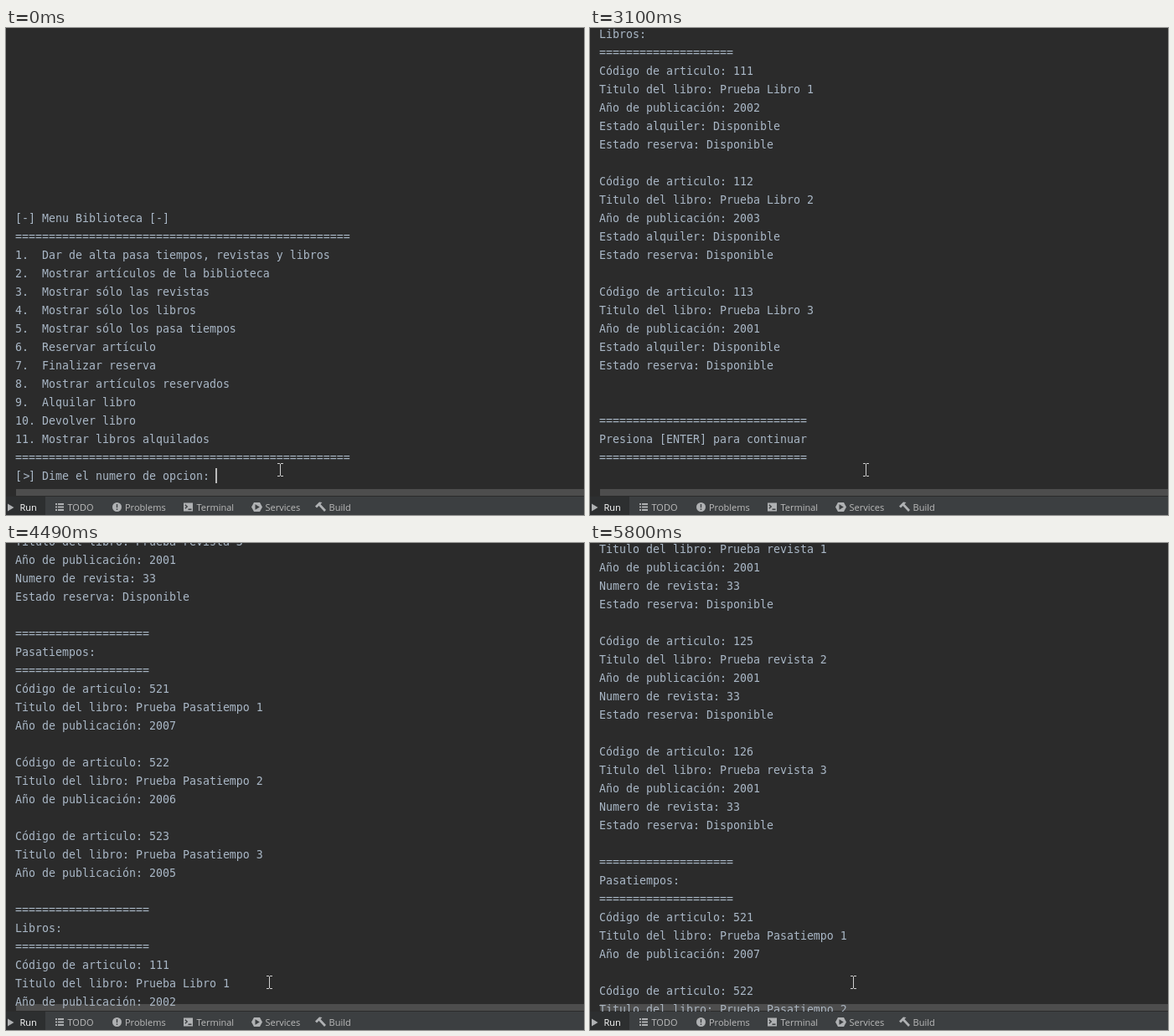
Recreate the animation shown at these times as an HTML page. Size 690 px wide and 582 px high, loop 8380 ms.

```html
<!DOCTYPE html>
<html lang="es">
<head>
<meta charset="utf-8">
<title>Menu Biblioteca</title>
<style>
  html, body { margin: 0; width: 100%; height: 100%; overflow: hidden; background: #2b2b2b; }
  svg { display: block; }
  .console text { font: 13.29px "DejaVu Sans Mono", "Noto Sans Mono", monospace; fill: #a9b7c6; white-space: pre; font-variant-ligatures: none; }
  .tabs text { font: 11px "Open Sans", "Noto Sans", sans-serif; fill: #bbbbbb; }
  .icon { fill: #afb1b3; }
  .cut { fill: none; stroke: #3c3f41; stroke-width: 1.4; }
</style>
</head>
<body>
<svg width="690" height="582" viewBox="0 0 690 582">
  <defs><clipPath id="view"><rect width="690" height="560"/></clipPath></defs>
  <rect width="690" height="582" fill="#2b2b2b"/>
  <g class="console" clip-path="url(#view)">
    <g id="rows"></g>
    <rect id="caret" width="2" height="18" fill="#bbbbbb"/>
  </g>
  <rect x="12" y="551" width="678" height="8" fill="#a6a6a6" fill-opacity=".28"/>
  <g class="tabs">
    <rect y="560" width="690" height="22" fill="#3c3f41"/>
    <rect y="560" width="47" height="22" fill="#2d2f30"/>
    <path class="icon" d="M2 568.5L9.5 573L2 577.5Z"/>
    <path class="icon" d="M59 568h2v2h-2zM62 568h7v2h-7zM59 571.5h2v2h-2zM62 571.5h7v2h-7zM59 575h2v2h-2zM62 575h7v2h-7z"/>
    <circle class="icon" cx="132.5" cy="572.5" r="5.5"/>
    <path class="cut" d="M132.5 569v4.2M132.5 574.4v1.6"/>
    <rect class="icon" x="212" y="567.5" width="11" height="10"/>
    <path class="cut" d="M213.8 569.8l2.4 2.2l-2.4 2.2M217.5 575.2h4"/>
    <path class="icon" d="M293 572.5L296 567H303L306 572.5L303 578H296Z"/>
    <path fill="#3c3f41" d="M297.5 569.3L302.8 572.5L297.5 575.7Z"/>
    <path class="icon" d="M369 571.5L374 566.5L377.5 567L375.5 569L382 576L380 578L373.5 571L371 573.5Z"/>
    <text x="16.5" y="577" style="fill:#fff">Run</text>
    <text x="73.5" y="577">TODO</text>
    <text x="142" y="577">Problems</text>
    <text x="227.5" y="577">Terminal</text>
    <text x="309.5" y="577">Services</text>
    <text x="385.5" y="577">Build</text>
  </g>
  <path id="mouse" d="M-3.5 -7.5H-.5M.5 -7.5H3.5M0 -7V7M-3.5 7.5H-.5M.5 7.5H3.5" fill="none" stroke="#d0d0d0"/>
</svg>
<script>
const LOOP = 8380, STEP = 65.85, ROW = 22, BASE = 540, PROMPT = 14;
const $ = id => document.getElementById(id);
const bar = n => "=".repeat(n);
const heading = name => [bar(20), name + ":", bar(20)];
const item = (code, title, year, ...rest) => [
  "Código de articulo: " + code,
  "Titulo del libro: Prueba " + title,
  "Año de publicación: " + year,
  ...rest, ""
];
const free = what => `Estado ${what}: Disponible`;

const options = [
  "Dar de alta pasa tiempos, revistas y libros",
  "Mostrar artículos de la biblioteca",
  "Mostrar sólo las revistas",
  "Mostrar sólo los libros",
  "Mostrar sólo los pasa tiempos",
  "Reservar artículo",
  "Finalizar reserva",
  "Mostrar artículos reservados",
  "Alquilar libro",
  "Devolver libro",
  "Mostrar libros alquilados"
];

const lines = [
  "[-] Menu Biblioteca [-]", bar(50),
  ...options.map((s, i) => (i + 1 + ".").padEnd(4) + s),
  bar(50), "", "",
  ...heading("Revistas"),
  ...[1, 2, 3].flatMap(i => item(123 + i, "revista " + i, 2001, "Numero de revista: 33", free("reserva"))),
  ...heading("Pasatiempos"),
  ...[1, 2, 3].flatMap(i => item(520 + i, "Pasatiempo " + i, 2008 - i)),
  ...heading("Libros"),
  ...[2002, 2003, 2001].flatMap((y, i) => item(111 + i, "Libro " + (i + 1), y, free("alquiler"), free("reserva"))),
  "", bar(31), "Presiona [ENTER] para continuar", bar(31), ""
];
const last = lines.length - 1;

function make(tag, attrs, parent, text = "") {
  const el = document.createElementNS("http://www.w3.org/2000/svg", tag);
  for (const k in attrs) el.setAttribute(k, attrs[k]);
  el.textContent = text;
  return parent.appendChild(el);
}
const rows = lines.map((s, i) =>
  make("text", { x: 11, y: BASE + ROW * (i - last) }, $("rows"), s));
const prompt = rows[PROMPT];
make("tspan", {}, prompt, "[");
make("tspan", { dx: 1.5 }, prompt, ">");
make("tspan", { dx: -1.5 }, prompt, "] Dime el numero de opcion: ");
const typed = make("tspan", { style: "fill:#2f4032" }, prompt, "2");

// Wheel scroll: [step, pixels]
const wheel = [[55, 0], [59, 66], [63, 215], [68, 453], [70, 528], [73, 528],
  [77, 594], [78, 611], [82, 660], [85, 660], [88, 726]];

function scrollAt(t) {
  if (t < 2180) return ROW * (last - PROMPT);
  if (t < 2380) return ROW * (last - PROMPT - 1);
  const n = Math.floor(t / STEP);
  if (n < 38) return ROW * (n < 37 ? 24 : 8);
  const i = wheel.findIndex(k => n <= k[0]);
  if (i < 0) return 726;
  if (i === 0) return 0;
  const [n0, y0] = wheel[i - 1], [n1, y1] = wheel[i];
  return Math.round(y0 + (y1 - y0) * (n - n0) / (n1 - n0));
}

// Times at which the caret toggles, starting visible
const blinks = [70, 590, 1050, 1580, 3100, 3570];

function draw(t) {
  const off = scrollAt(t), wheeling = t >= 3570;
  const printed = wheeling ? last : last - off / ROW;
  $("rows").setAttribute("transform", `translate(0 ${off})`);
  rows.forEach((r, i) => r.setAttribute("visibility", i <= printed ? "visible" : "hidden"));
  typed.setAttribute("display", t < 1710 ? "none" : "inline");

  const on = blinks.filter(b => t >= b).length % 2 === 0;
  $("caret").setAttribute("x", t < 1710 ? 250 : t < 2180 ? 258 : 11);
  $("caret").setAttribute("y", 526 + (wheeling ? off : 0));
  $("caret").setAttribute("visibility", on ? "visible" : "hidden");

  const [mx, my] = t < 400 ? [327.5, 528] : t < 3630 ? [329.5, 528] : [314.5, 525];
  $("mouse").setAttribute("transform", `translate(${mx} ${my})`);
}

const start = performance.now();
function tick() {
  draw((performance.now() - start) % LOOP);
  requestAnimationFrame(tick);
}
tick();
</script>
</body>
</html>
```
